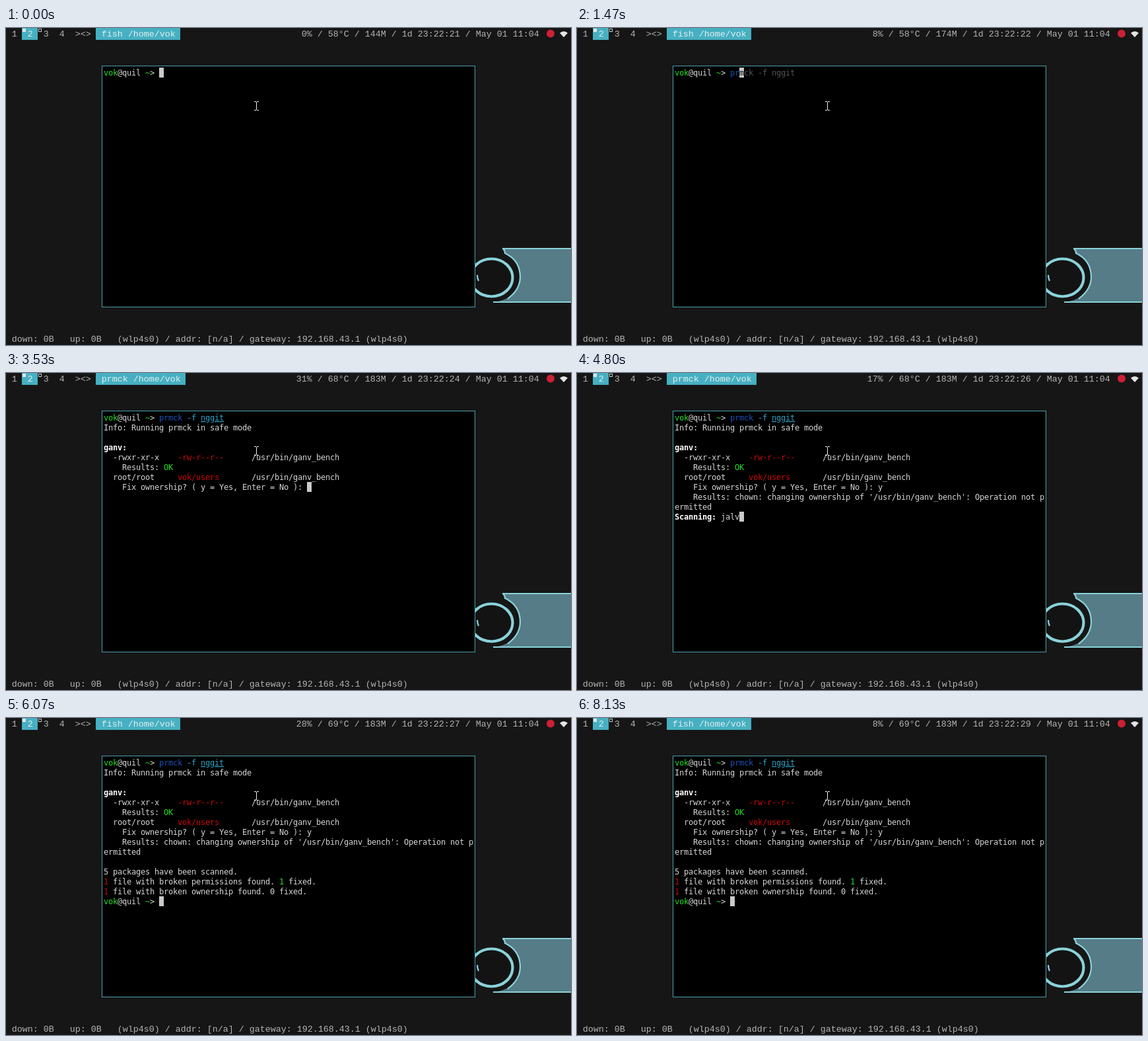
Animation, 856 px wide and 480 px high, one loop 8.19 s. Source, as an HTML page:

```html
<!DOCTYPE html>
<html lang="en">
<head>
<meta charset="utf-8">
<title>Terminal session</title>
<style>
  html, body { margin: 0; width: 100%; height: 100%; overflow: hidden; background: #161616; }
  svg { display: block; width: 856px; height: 480px; }
  .bar { font: 13.33px "Liberation Mono", monospace; fill: #b4b4b4; }
  .term { font: 12px "DejaVu Sans Mono", monospace; fill: #d6d6d6; }
  .term .bold { font-weight: bold; fill: #fff; }
  .term .green { fill: #22e022; }
  .term .red { fill: #cd0808; }
  .term .cmd { fill: #1c50b8; }
  .term .arg { fill: #2ba3c6; }
  .term .path { fill: #2ba3c6; text-decoration: underline; }
  .term .hint { fill: #555; }
  .term .dark { fill: #111; }
  .bar .on { fill: #e4eef0; }
</style>
</head>
<body>
<svg viewBox="0 0 856 480" xmlns="http://www.w3.org/2000/svg">
  <rect width="856" height="480" fill="#161616"/>

  <!-- wallpaper -->
  <g fill="none" stroke="#8ad2da">
    <path d="M752 334H856V415H738Q756 413 764 406Q779 394 779 377Q779 352 757 342Z" fill="#557c87" stroke="none"/>
    <path d="M752 334H856M738 415H856" stroke-width="2"/>
    <path d="M753 334Q756 337 756 341Q779 352 779 377Q779 396 760 410" stroke-width="2.2"/>
    <ellipse cx="735.5" cy="378" rx="32" ry="28.5" fill="#131313" stroke-width="4.2"/>
    <path d="M714 374Q714 379 716 383" stroke-width="2.2"/>
  </g>

  <!-- status bars -->
  <rect x="24" width="24" height="18" fill="#46b0c2"/>
  <rect id="titleBox" x="136" height="18" fill="#46b0c2"/>
  <rect x="25" y="1" width="5" height="5" fill="#e4e4e4"/>
  <rect x="49.5" y="1.5" width="4" height="4" fill="none" stroke="#c8c8c8"/>
  <g id="bars" class="bar"></g>
  <g id="live" class="bar"></g>
  <circle cx="825" cy="8.5" r="6" fill="#cc2034"/>
  <path d="M839 7.5Q845 2.5 851 7.5L845 14Z" fill="#e4e4e4"/>

  <!-- terminal window -->
  <rect x="145.5" y="57.5" width="565" height="365" fill="#000" stroke="#4a9fac"/>
  <rect id="caret" width="7" height="15" fill="#cacaca"/>
  <g id="screen" class="term"></g>
  <path d="M376 111.5H379M380 111.5H383M376 124.5H379M380 124.5H383M379.5 112V124" fill="none" stroke="#f0f0f0"/>
</svg>
<script>
const LOOP = 8190;
const USER = 'vok', MACHINE = 'quil';
const byId = id => document.getElementById(id);
const bars = byId('bars'), live = byId('live'), screen = byId('screen');

// Places text on a fixed character grid.
function put(parent, x, y, step, text, cls) {
  const node = document.createElementNS('http://www.w3.org/2000/svg', 'text');
  node.setAttribute('x', Array.from(text, (_, i) => x + i * step).join(' '));
  node.setAttribute('y', y);
  if (cls) node.setAttribute('class', cls);
  node.textContent = text.replace(/ /g, '\u00a0');
  parent.append(node);
}
const putBar = (parent, x, y, text, cls) => put(parent, x + 0.7, y, 8, text, cls);

['1', '2', '3', '4'].forEach((tag, i) => putBar(bars, 8 + 24 * i, 13, tag, i === 1 ? 'on' : ''));
putBar(bars, 104, 13, '><>');
putBar(bars, 8, 475, 'down: 0B   up: 0B   (wlp4s0) / addr: [n/a] / gateway: 192.168.43.1 (wlp4s0)');

// Each step: start time in ms, then its values.
const STATUS = [
  [0, 0, 58, 144, 21],
  [1270, 8, 58, 174, 22],
  [2330, 10, 58, 182, 23],
  [3400, 31, 68, 183, 24],
  [4530, 17, 68, 183, 26],
  [5670, 28, 69, 183, 27],
  [6800, 10, 69, 183, 28],
  [7930, 8, 69, 183, 29]
];
const SCANS = [[4530, 'jalv'], [5000, 'lilv'], [5200, 'patchage'], [5400, 'suil']];
const TYPED = [[0, 0], [1270, 1], [1400, 2], [1870, 14]];
const RUN = 2130, ASK = 2270, YES = 4060, REPLY = 4460, DONE = 5600;

const at = (steps, t) => steps.filter(step => step[0] <= t).pop();

// A line is a list of runs; a run is plain text or [class, text].
const prompt = [['green', USER], '@' + MACHINE + ' ', ['green', '~'], '> '];
const COMMAND = 'prmck -f nggit';
const command = [...prompt, ['cmd', 'prmck'], ' ', ['arg', '-f'], ' ', ['path', 'nggit']];
const FILE = '/usr/bin/ganv_bench';

function typingLine(count) {
  if (!count) return prompt;
  if (count === COMMAND.length) return command;
  return [...prompt, ['cmd', COMMAND.slice(0, count)],
    ['dark', COMMAND[count]], ['hint', COMMAND.slice(count + 1)]];
}

function sessionAt(t) {
  if (t < RUN) {
    const count = at(TYPED, t)[1];
    return { lines: [typingLine(count)], caret: 12 + count };
  }
  const lines = [command, ['Info: Running prmck in safe mode']];
  if (t < ASK) return { lines: [...lines, []], caret: 0 };

  const question = '    Fix ownership? ( y = Yes, Enter = No ): ' + (t < YES ? '' : 'y');
  lines.push(
    [],
    [['bold', 'ganv:']],
    ['  -rwxr-xr-x    ', ['red', '-rw-r--r--'], '      ' + FILE],
    ['    Results: ', ['green', 'OK']],
    ['  root/root     ', ['red', USER + '/users'], '       ' + FILE],
    [question]
  );
  if (t < REPLY) return { lines, caret: question.length };

  lines.push(
    [`    Results: chown: changing ownership of '${FILE}': Operation not p`],
    ['ermitted']
  );
  if (t < DONE) {
    const scan = at(SCANS, t);
    const name = scan ? scan[1] : '';
    lines.push([['bold', 'Scanning:'], ' ' + name]);
    return { lines, caret: 10 + name.length };
  }
  lines.push(
    [],
    ['5 packages have been scanned.'],
    [['red', '1'], ' file with broken permissions found. ', ['green', '1'], ' fixed.'],
    [['red', '1'], ' file with broken ownership found. 0 fixed.'],
    prompt
  );
  return { lines, caret: 12 };
}

function drawSession({ lines, caret }) {
  screen.replaceChildren();
  lines.forEach((line, row) => {
    let col = 0;
    for (const run of line) {
      const [cls, text] = Array.isArray(run) ? run : ['', run];
      put(screen, 148 + 7 * col, 72 + 15 * row, 7, text, cls);
      col += text.length;
    }
  });
  byId('caret').setAttribute('x', 148 + 7 * caret);
  byId('caret').setAttribute('y', 60 + 15 * (lines.length - 1));
}

function drawBar(title, status) {
  live.replaceChildren();
  byId('titleBox').setAttribute('width', 8 * (title.length + 2));
  putBar(live, 144, 13, title, 'on');
  putBar(live, 807 - 8 * status.length, 13, status);
}

let shown = '';
function render(t) {
  const [, cpu, heat, memory, second] = at(STATUS, t);
  const title = (t >= RUN && t < DONE ? 'prmck' : 'fish') + ' /home/' + USER;
  const status = `${cpu}% / ${heat}°C / ${memory}M / 1d 23:22:${second} / May 01 11:04`;
  const session = sessionAt(t);
  const state = JSON.stringify([title, status, session]);
  if (state === shown) return;
  shown = state;
  drawBar(title, status);
  drawSession(session);
}

const start = performance.now();
function tick() {
  render((performance.now() - start) % LOOP);
  requestAnimationFrame(tick);
}
tick();
</script>
</body>
</html>
```
